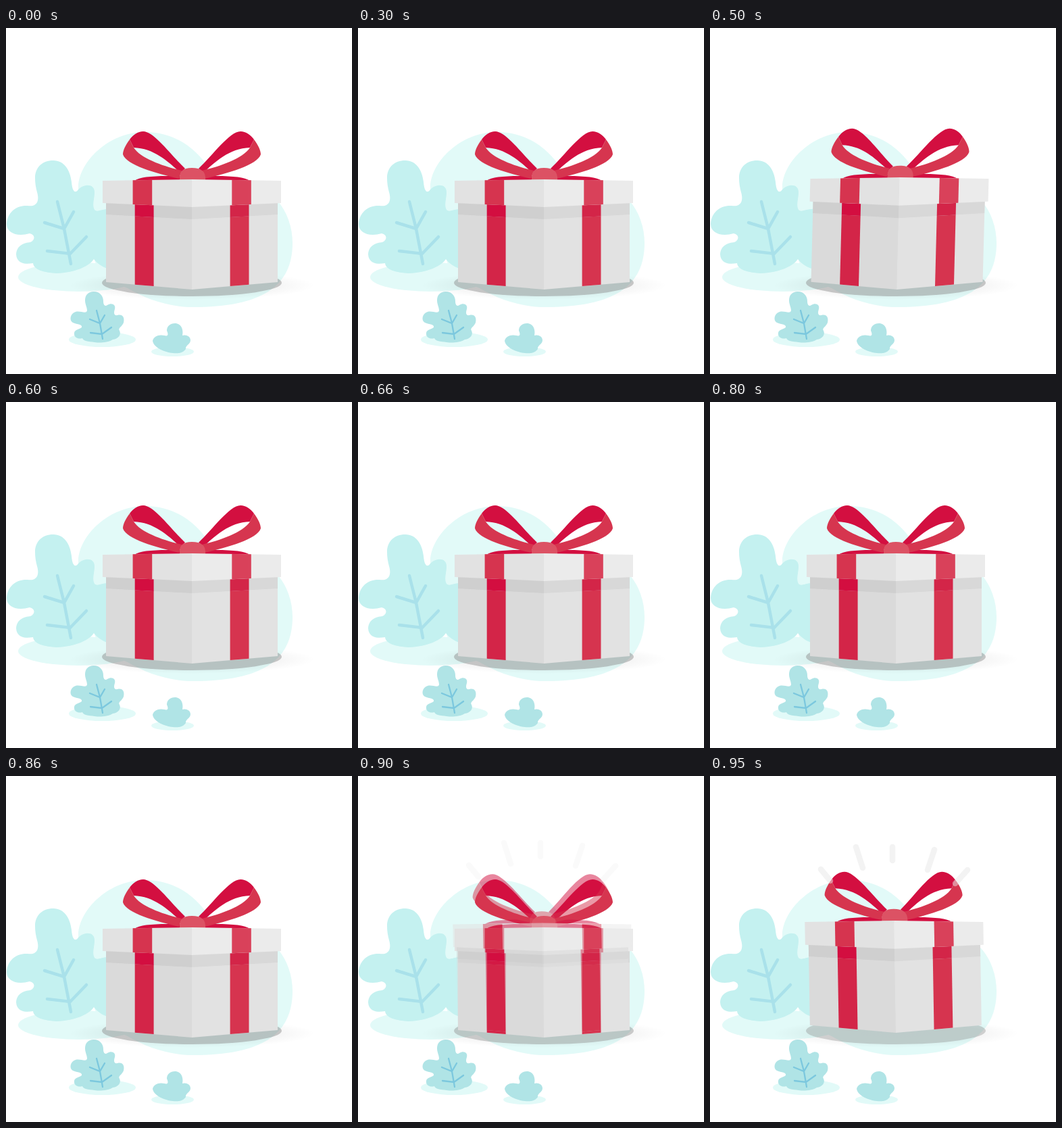
Animation, 512 px wide and 512 px high, one loop 1050 ms. Source, as an HTML page:

```html
<!DOCTYPE html>
<html lang="en">
<head>
<meta charset="utf-8">
<title>Gift box</title>
<style>
html, body { margin: 0; width: 100%; height: 100%; overflow: hidden; background: #fff; }
svg { display: block; width: 100%; height: 100%; }
</style>
</head>
<body>
<svg viewBox="0 0 512 512">
  <defs>
    <radialGradient id="soft">
      <stop offset="0" stop-color="#000" stop-opacity=".04"/>
      <stop offset=".72" stop-color="#000" stop-opacity=".035"/>
      <stop offset="1" stop-color="#000" stop-opacity="0"/>
    </radialGradient>

    <g id="loop">
      <path fill="#d30f40" d="M183 165C188 158 195 153 203 153C219 153 244 188 265 208L258 214C241 199 220 178 189 177Z"/>
      <path fill="#d6354f" d="M183 165C177 173 173 181 173 187C178 203 222 215 256 223L260 211C234 205 199 193 189 177Z"/>
    </g>

    <g id="gift">
      <path fill="#d30f40" d="M190 226C200 219 228 218 275 220C322 218 350 219 361 226Z"/>
      <use href="#loop"/>
      <use href="#loop" transform="translate(550) scale(-1 1)"/>
      <path fill="#dc5264" d="M257 225C256 212 262 207 275 207C289 207 296 212 295 225Z"/>

      <path fill="#dadada" d="M148 258H275.5V387L148 376Z"/>
      <path fill="#e2e2e2" d="M275 258H402V376L275 387Z"/>
      <path fill="#d32548" d="M190.700 258H218.600V382L190.700 379.700Z"/>
      <path fill="#d6344f" d="M331.600 258H359.500V379.700L331.600 382Z"/>
      <path fill="#cfcfcf" d="M148 258H275.500V283L148 276Z"/>
      <path fill="#d8d8d8" d="M275 258H402V276L275 283Z"/>
      <path fill="#d30e40" d="M190.700 258H218.600V280L190.700 278.400Z"/>
      <path fill="#d32548" d="M331.600 258H359.500V278.400L331.600 280Z"/>

      <path fill="#e2e2e2" d="M143 226L275.500 224V265L143 259Z"/>
      <path fill="#ebebeb" d="M275 224L407 226V259L275 265Z"/>
      <path fill="#d6344f" d="M187.600 225.300L216.200 225V262.300L187.600 261Z"/>
      <path fill="#d9415a" d="M334.300 225L362.800 225.300V261L334.300 262.300Z"/>
    </g>
  </defs>

  <path fill="#e2faf8" d="M107 235C108 198 152 154 205 154C252 154 282 180 300 207C328 236 376 226 402 256C416 272 424 295 424 318C424 383 378 413 277 413C240 413 207 401 180 385C153 374 133 361 130 338C127 300 107 278 107 235Z"/>
  <ellipse cx="108" cy="368.500" rx="90" ry="21.500" fill="#e2faf8"/>

  <path fill="#c4f1f0" d="M43 222C43 206 54 196 70 196C86 196 95 210 97 228C98 241 102 246 107 239C114 231 131 229 131 243C131 253 127 262 131 269C136 274 141 266 160 268V357C148 358 136 350 130 342C124 352 103 362 75 363C57 362 41 358 40 348C29 350 16 349 15 335C16 321 27 318 36 317C43 314 44 306 35 304C17 309 1 304 1 290C2 272 16 262 32 263C45 265 50 257 46 243C44 236 43 229 43 222Z"/>
  <path fill="none" stroke="#a9e1ea" stroke-width="4.500" stroke-linecap="round" d="M76 257L86 297L96 349M57 288L86 297L100 272M61 330L95 334L119 309"/>

  <ellipse cx="142.500" cy="461" rx="49.500" ry="11" fill="#e2faf8"/>
  <path fill="#b0e4e6" d="M117 403C117 395 122 390 130 390C138 390 144 396 144 404C144 411 147 412 150 410C156 406 163 409 161 416C159 422 160 426 165 425C172 423 176 428 174 436C172 442 165 444 168 448C171 454 166 460 158 461C150 466 138 466 131 465C122 464 114 463 113 459C107 461 100 458 101 451C102 446 109 446 112 443C113 438 106 439 99 436C93 433 95 422 103 420C110 418 119 424 120 418C120 413 117 409 117 403Z"/>
  <path fill="none" stroke="#7cc8de" stroke-width="2.300" stroke-linecap="round" d="M134 418L139 437L143 460M124 431L139 437L146 425M125 451L142 453L156 443"/>

  <ellipse cx="246.500" cy="479" rx="31.500" ry="7" fill="#e2faf8"/>
  <path fill="#b0e4e6" d="M238 448C238 441 243 437 250 437C258 437 263 444 261 455C266 453 273 456 273 462C273 468 265 470 266 475C262 481 254 482 247 481C236 480 219 474 217 463C218 456 227 453 234 455C241 457 240 452 238 448Z"/>

  <ellipse cx="275" cy="381" rx="182" ry="21" fill="url(#soft)"/>
  <ellipse id="ground" cx="275" cy="377" rx="133" ry="20" fill="#8f8f8f"/>
  <use id="box" href="#gift"/>
  <use id="ghost" href="#gift"/>
  <path id="rays" fill="none" stroke="#e8e8e8" stroke-width="8.500" stroke-linecap="round" d="M270 105V125M216 105L226 136M332 109L322 139M164 138L178 155M381 139L363 159"/>
</svg>
<script>
const LOOP = 1050, BASE = 386;
const $ = id => document.getElementById(id);

// A pose leans by `lean`, stretches by `tall` and moves by dx, dy
const pose = (lean, tall, dx = 0, dy = 0) =>
  `matrix(1 0 ${-lean} ${tall} ${lean * BASE + dx} ${BASE * (1 - tall) + dy})`;

const REST = pose(0, 1);
const RIGHT = pose(.026, 1.018, 1.3);
const left = dy => pose(-.017, 1.018, 0, dy);

const steps = [
  { at: 0, box: REST },
  { at: 500, box: RIGHT },
  { at: 600, box: REST },
  { at: 700, box: left(0) },
  { at: 800, box: REST },
  { at: 900, box: REST, ghost: left(-3.5), rays: .24, rayY: -6, shade: .44 },
  { at: 950, box: left(-7), rays: .5, shade: .38 }
];

function draw(ms) {
  const t = ms % LOOP;
  const { box, ghost, rays = 0, rayY = 0, shade = .48 } = steps.filter(s => s.at <= t).pop();
  $("box").setAttribute("transform", box);
  $("ghost").setAttribute("transform", ghost || REST);
  $("ghost").setAttribute("opacity", ghost ? .5 : 0);
  $("rays").setAttribute("transform", `translate(0 ${rayY})`);
  $("rays").setAttribute("opacity", rays);
  $("ground").setAttribute("fill-opacity", shade);
}

const start = performance.now();
function tick() {
  draw(performance.now() - start);
  requestAnimationFrame(tick);
}
tick();
</script>
</body>
</html>
```
